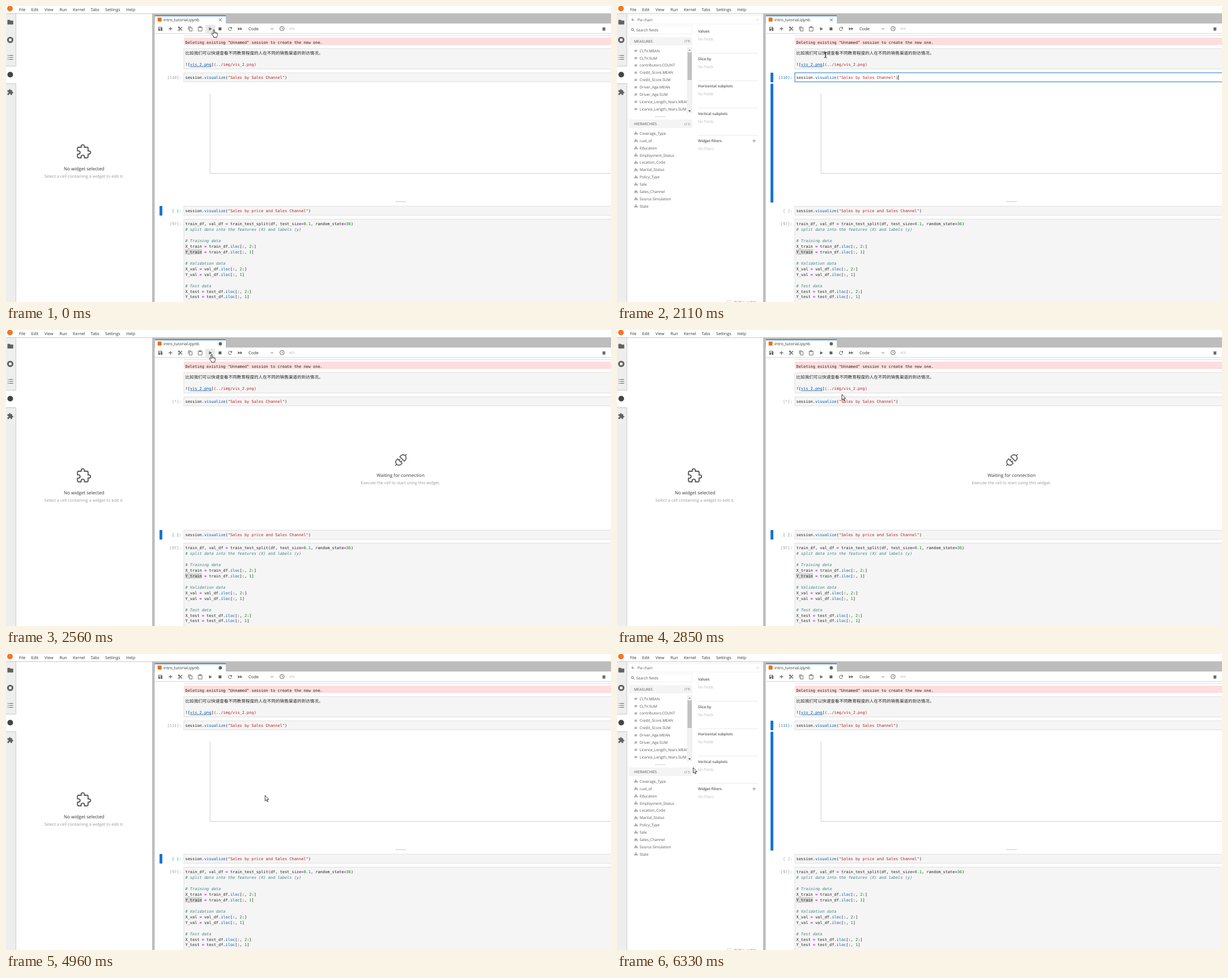
These frames come from a looping animation (1068x524 px, 8 s). An HTML page:

```html
<!DOCTYPE html>
<html lang="en">
<head>
<meta charset="utf-8">
<title>Notebook</title>
<style>
html, body { margin: 0; width: 100%; height: 100%; overflow: hidden; background: #fff; }
svg { display: block; width: 100%; height: 100%; }
text { font-family: "Open Sans", "Noto Sans", sans-serif; text-rendering: geometricPrecision; white-space: pre; }
.mono { font-family: "DejaVu Sans Mono", "Liberation Mono", monospace; }
.cjk { font-family: "Noto Sans CJK SC", "Noto Sans CJK", sans-serif; }
.com { fill: #408080; font-style: italic; }
.str { fill: #ba2121; }
.prop { fill: #05a; }
.op { fill: #a2f; font-weight: bold; }
.num { fill: #080; }
</style>
</head>
<body>
<svg id="stage" viewBox="0 0 1068 524"></svg>
<script>
const BLUE = '#1976d2', INK = '#616161', LINE = '#bdbdbd';
const stage = document.getElementById('stage');

const rect = (x, y, w, h, fill, extra = '') =>
  `<rect x="${x}" y="${y}" width="${w}" height="${h}" fill="${fill}" ${extra}/>`;
const fillPath = (d, fill = INK, extra = '') => `<path d="${d}" fill="${fill}" ${extra}/>`;
const stroke = (d, color = INK, width = 1, extra = '') =>
  `<path d="${d}" fill="none" stroke="${color}" stroke-width="${width}" ${extra}/>`;
const dot = (x, y, r, fill) => `<circle cx="${x}" cy="${y}" r="${r}" fill="${fill}"/>`;
const at = (x, y, body, more = '') => `<g transform="translate(${x} ${y}) ${more}">${body}</g>`;

// y is the middle of the capital letters
const text = (x, y, str, size, fill = '#333', extra = '') =>
  `<text x="${x}" y="${y + size * .36}" font-size="${size}" fill="${fill}" ${extra}>${str}</text>`;
const mono = (x, y, str, fill = '#212121', extra = '') =>
  text(x, y, str, 6.94, fill, 'class="mono" ' + extra);
const centred = (x, y, str, size, fill) => text(x, y, str, size, fill, 'text-anchor="middle"');

function tokenClass(s) {
  if (s[0] === '#') return 'com';
  if (s[0] === '"') return 'str';
  if (s === '=') return 'op';
  return /\d/.test(s[0]) ? 'num' : 'prop';
}
const code = (y, src) => mono(316.5, y, src.replace(
  /#.*|"[^"]*"|(?<=\.)[a-z]\w+|=|\b\d[\d.]*/g,
  s => `<tspan class="${tokenClass(s)}">${s}</tspan>`));
const prompt = (y, label, active) =>
  mono(309.6, y, `[${label}]:`, active ? '#307fc1' : '#9a9a9a', 'text-anchor="end"');
const cell = (y, h, active) => rect(314, y, 760, h, active ? '#fff' : '#f5f5f5',
  `stroke="${active ? BLUE : '#e0e0e0'}"`);
const bar = (y, h) => rect(271, y, 5, h, BLUE, 'rx="1"');

const PUZZLE = 'M20.5 11H19V7c0-1.1-.9-2-2-2h-4V3.5a2.5 2.5 0 0 0-5 0V5H4c-1.1 0-2 .9-2 2v3.8h1.5' +
  'c1.5 0 2.7 1.2 2.7 2.7s-1.2 2.7-2.7 2.7H2V20c0 1.1.9 2 2 2h3.8v-1.5c0-1.5 1.2-2.7 2.7-2.7' +
  's2.7 1.2 2.7 2.7V22H17c1.1 0 2-.9 2-2v-4h1.5a2.5 2.5 0 0 0 0-5z';

function frame() {
  const menu = [['File', 23], ['Edit', 44.5], ['View', 68], ['Run', 94.5], ['Kernel', 118],
    ['Tabs', 149.5], ['Settings', 175], ['Help', 212.5]];
  return dot(7, 4.5, 5, '#f37726') +
    menu.map(([s, x]) => text(x, 6, s, 7.2)).join('') +
    rect(0, 13, 17, 511, '#eee') + rect(0, 106, 18, 31, '#fff') +
    stroke('M0 13.5H262M17.5 13V106.5H0M0 137.5H17.5V524', LINE, .8) +
    fillPath('M2.5 25.5q0-1 1-1h3l1.3 1.3h4q1 0 1 1v5q0 1-1 1h-8.300q-1 0-1-1z') +
    dot(7.5, 60, 5.6, INK) + rect(5.3, 57.8, 4.400, 4.4, '#fff') +
    stroke('M3 87.5h1.400M5.500 87.5h7M3 91h1.400M5.500 91h7M3 94.5h1.400M5.500 94.5h7', INK, 1.2) +
    dot(7.5, 121.5, 5, '#444') +
    at(1.500, 146.5, fillPath(PUZZLE), 'scale(.5)') +
    rect(258, 13, 4.5, 511, LINE) + rect(262, 13, 806, 18, LINE);
}

function toolbar(dirty, hover) {
  const tabMark = dirty ? dot(378.3, 24.5, 2.9, INK) : stroke('M376 22.2l4.600 4.6m0-4.600l-4.600 4.6', '#444', .9);
  return rect(263, 17, 125, 15, '#fff') + rect(263, 16.7, 125, 1.4, BLUE) +
    rect(267.700, 20.500, 6.800, 7, '#ef6c00') +
    text(278, 24.7, 'intro_tutorial.ipynb', 7.1) + tabMark +
    rect(263, 31, 805, 17.5, '#fff') + stroke('M263 48.5H1068', '#ccc', .8) +
    (hover ? rect(352, 33.5, 17, 14, '#e8e8e8') : '') +
    fillPath('M269 37h5.500l1.500 1.5v5.500h-7zm1 1v2h4v-2zm2.500 3.200a1.200 1.200 0 1 0 .01 0z', INK, 'fill-rule="evenodd"') +
    stroke('M290.300 37.2v6.400M287.1 40.400h6.400', INK, 1.1) +
    stroke('M304.500 37l6.500 6.500M311 37l-5 5', INK, 1.1) +
    [[305.300, 38], [305.300, 42.800]].map(([x, y]) => `<circle cx="${x}" cy="${y}" r="1.2" fill="none" stroke="${INK}" />`).join('') +
    stroke('M322 42V36.800h4.500M323.700 38.300h4.800v6h-4.800z', INK, .9) +
    stroke('M339.300 37.500h6.800v6.800h-6.800z', INK, .9) + rect(341, 36.2, 3.400, 2.3, INK) +
    fillPath('M358.500 37.500l5 3-5 3z') + rect(375.300, 38, 5, 5, INK) +
    stroke('M398 39a3 3 0 1 0 .2 2.500', INK, 1) + fillPath('M399 36.800v3.200h-3.200z') +
    fillPath('M409.500 37.800l3.700 2.600-3.700 2.600zm3.900 0l3.700 2.600-3.700 2.600z') +
    text(428, 40, 'Code', 7.5) + stroke('M467.300 39.300l2.200 2.200 2.200-2.200', INK, 1) +
    `<circle cx="487.3" cy="40" r="3.8" fill="none" stroke="${INK}"/>` +
    stroke('M487.300 37.800v2.500l1.700 1', INK, .9) + text(500, 40, 'vcs', 6.6, '#aaa') +
    `<ellipse cx="1055.500" cy="40.700" rx="2" ry="3" fill="${INK}"/>` +
    stroke('M1052.300 38.500h6.400M1052.300 40.700h6.400M1052.300 42.900h6.400', INK, .8);
}

function notebook(s) {
  const lines = ['train_df, val_df = train_test_split(df, test_size=0.1, random_state=36)',
    '# split data into the features (X) and labels (y)', '',
    '# Training data', 'X_train = train_df.iloc[:, 2:]', 'Y_train = train_df.iloc[:, 1]', '',
    '# Validation data', 'X_val = val_df.iloc[:, 2:]', 'Y_val = val_df.iloc[:, 1]', '',
    '# Test data', 'X_test = test_df.iloc[:, 2:]', 'Y_test = test_df.iloc[:, 1]'];
  const chart = stroke('M360.200 155V296.300H1068', '#ccc', 1) + rect(687, 345.5, 19, 1.6, '#d8d8d8');
  const half = stroke('M-2.500-5.500V5.500H-5A5.500 5.500 0 0 1-5-5.500ZM-10.500 0H-14', '#555', 1.6);
  const waiting = at(697, 230.3, half + at(0.500, 0, half, 'rotate(180)') +
      stroke('M-2.500-2.300h3.200M-2.500 2.300h3.200', '#555', 1.4), 'rotate(-45)') +
    centred(696.5, 257, 'Waiting for connection', 8.06, '#333') +
    centred(696.5, 270, 'Execute the cell to start using this widget.', 7.3, '#999');
  return stroke('M314 52.500H1068', '#e0e0e0') +
    rect(314, 56, 754, 13, '#fdd') +
    mono(316.5, 64.3, 'Deleting existing "Unnamed" session to create the new one.') +
    cell(75.5, 36) +
    text(316.5, 83.2, '比如我们可以快速查看不同教育程度的人在不同的销售渠道的到访情况。', 7.6, '#212121', 'class="cjk"') +
    mono(316.5, 103.7, '![<tspan fill="#05a" text-decoration="underline">vis_2.png</tspan>]' +
      '<tspan class="str">(../img/vis_2.png)</tspan>') +
    cell(118.2, 16, s.editing) + prompt(126.5, s.label, s.selected) +
    code(126.5, 'session.visualize("Sales by Sales Channel")') +
    (s.editing ? rect(496.3, 122, .8, 9, '#000') : '') +
    (s.busy ? waiting : chart) +
    (s.selected ? bar(118, 17) + bar(137.5, 210.5) : bar(354, 17)) +
    cell(354.3, 16) + prompt(362.8, ' ', !s.selected) +
    code(362.8, 'session.visualize("Sales by price and Sales Channel")') +
    cell(377.3, 160) + prompt(385.5, '97') + rect(316, 430.5, 30, 9.5, '#d6d6d6') +
    lines.map((l, i) => code(385.5 + i * 9.96, l)).join('');
}

function noWidget() {
  return at(124, 244.5, stroke(PUZZLE, '#555', 1.7), 'scale(1.1)') +
    centred(137.7, 288, 'No widget selected', 8.1, '#333') +
    centred(137.7, 301, 'Select a cell containing a widget to edit it.', 7.33, '#999');
}

function fieldPanel() {
  const measures = ['CLTV.MEAN', 'CLTV.SUM', 'contributors.COUNT', 'Credit_Score.MEAN', 'Credit_Score.SUM',
    'Driver_Age.MEAN', 'Driver_Age.SUM', 'Licence_Length_Years.MEAN', 'Licence_Length_Years.SUM'];
  const levels = ['Coverage_Type', 'cust_id', 'Education', 'Employment_Status', 'Location_Code',
    'Marital_Status', 'Policy_Type', 'Sale', 'Sales_Channel', 'Source Simulation', 'State'];
  const sections = ['Values', 'Slice by', 'Horizontal subplots', 'Vertical subplots', 'Widget filters'];
  const heading = (y, s, n) => rect(21, y - 7.5, 112, 15, '#f4f4f4') + text(30, y, s, 6.5, '#555') +
    text(129, y, `(${n})`, 5.6, '#666', 'text-anchor="end"');
  const item = (y, s) => text(40, y, s, 6.6, '#555');
  const frameLine = 'stroke="#eee" stroke-width=".8"';
  return rect(21, 16.5, 235, 15.5, '#fff', frameLine) +
    dot(28, 24, 2.3, '#aaa') + fillPath('M28 24V21.300A2.700 2.700 0 0 1 30.700 24z', '#fff') +
    text(36, 24.7, 'Pie chart', 6.5, '#555') + stroke('M245.500 23l2.500 2.500 2.500-2.500', '#bbb', .9) +
    rect(21, 35, 112, 14.5, '#fff', frameLine) +
    `<circle cx="27.3" cy="41.7" r="2" fill="none" stroke="#555" stroke-width=".8"/>` +
    stroke('M28.800 43.200l2.200 2.200', '#555', .9) + text(34, 42.5, 'Search fields', 6.6, '#555') +
    heading(62.3, 'MEASURES', 19) +
    measures.map((s, i) => {
      const y = 79.3 + i * 12.9;
      return stroke(`M32.400 ${y - 2.2}l-.6 4.400m2.800-4.400l-.6 4.400m-3-3h4.600m-4.900 1.700h4.600`, '#777', .6) + item(y, s);
    }).join('') +
    rect(123.5, 73, 9.5, 117, '#f1f1f1') + rect(124.5, 82, 7.5, 49, '#c1c1c1') +
    fillPath('M126.200 79l2-2.500 2 2.500z', '#888') + fillPath('M126.200 184.800l2 2.500 2-2.500z', '#333') +
    rect(67, 195.3, 19, 1.4, '#ddd') +
    heading(208.5, 'HIERARCHIES', 11) +
    levels.map((s, i) => {
      const y = 225.6 + i * 12.88;
      return stroke(`M31 ${y + 2.7}v-2.700h5v2.700M33.500 ${y + 2.7}v-5.200h-1.400`, '#777', .9) + item(y, s);
    }).join('') +
    sections.map((s, i) => {
      const y = 44.7 + i * 48.5, last = i === 4;
      return text(143, y, s, 6.5, '#555', 'font-weight="600"') +
        text(143, y + 14, last ? 'No filters' : 'No fields', 6.7, '#bbb') +
        (last ? stroke('M242 235.700v6M239 238.700h6', '#777', .8) : stroke(`M143 ${y + 39}H249`, '#e8e8e8', .9));
    }).join('') +
    rect(194.5, 521.5, 7.5, 7.5, '#fff', 'stroke="#ddd"') + text(207, 525, 'Defer update', 6.6, '#555');
}

// tick, x, y of the pointer's hot spot
const PATH = [
  [-1, 367, 42], [2, 372, 130], [3, 372, 130], [6, 356, 49], [7, 367, 87], [10, 373, 130],
  [11, 373, 130], [15, 363, 43.5], [16, 363, 43.5], [18, 397, 114], [19, 397, 114],
  [24, 581, 250], [25, 581, 250], [26, 533, 250], [28, 451, 245], [30, 549, 247], [31, 549, 247],
  [34, 274, 257], [38, 150, 211], [41, 134.500, 201]
];

function pointerAt(k) {
  const i = PATH.findIndex(p => p[0] >= k);
  if (i < 0) return PATH[PATH.length - 1].slice(1);
  if (i === 0) return PATH[0].slice(1);
  const [k0, x0, y0] = PATH[i - 1], [k1, x1, y1] = PATH[i];
  const f = (k - k0) / (k1 - k0);
  return [x0 + (x1 - x0) * f, y0 + (y1 - y0) * f];
}

const overRun = (x, y) => x > 352 && x < 369 && y > 33 && y < 48;
const overText = (x, y) => x > 314 && [[56, 69], [75, 112], [118, 135]].some(([a, b]) => y > a && y < b);

function pointer(x, y) {
  const outline = 'stroke="#222" stroke-width=".9" stroke-linejoin="round"';
  if (overRun(x, y)) return at(x, y, fillPath(
    'M-1 1q0-1.200 1-1.200t1 1.200v3.500q1.600-.6 1.900.6 1.500-.5 1.800.7 1.600-.3 1.600 1.200v2.500q0 1.500-1 3V13.500H-.5V12l-3.500-4.500q-.6-1 .3-1.400 1-.3 2.700 1.600z',
    '#fff', outline) + stroke('M1 4.500v2.500M2.900 5.100v2M4.700 5.800v1.600', '#222', .7));
  if (overText(x, y)) return at(x, y, stroke('M-2.500-4.500h1.800q.7 0 .7.700V3.800q0 .7-.7.7h-1.800M2.500-4.500H.7Q0-4.500 0-3.800V3.800q0 .7.7.7h1.800', '#222', .9));
  return at(x, y, fillPath('M0 0V9.800l2.200-2 1.500 3.500 1.500-.7-1.500-3.300h3z', '#fff', outline));
}

function scene(k) {
  const [x, y] = pointerAt(k);
  const editing = k >= 11 && k < 16;
  const state = {
    editing,
    selected: editing || k >= 34,
    busy: k >= 16 && k < 20,
    label: k < 16 ? '110' : k < 20 ? '*' : '111'
  };
  return notebook(state) + frame() + toolbar(k >= 16, overRun(x, y)) +
    (state.selected ? fieldPanel() : noWidget()) + pointer(x, y);
}

// The screen refreshes in even ticks, as a screen recording does
let shown;
function tick() {
  const t = performance.now() % 8000;
  const k = Math.min(41, Math.floor((t - 125) / 150.8));
  if (k !== shown) stage.innerHTML = scene(shown = k);
  requestAnimationFrame(tick);
}
tick();
</script>
</body>
</html>
```
